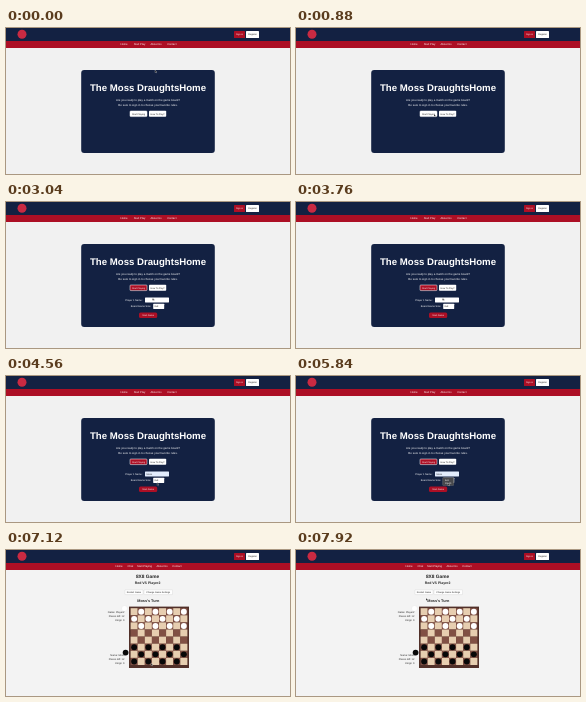
An HTML page that plays this animation: 284 by 146 pixels, repeating every 8 s.

```html
<!DOCTYPE html>
<html lang="en">
<head>
<meta charset="utf-8">
<title>Board game</title>
<style>
  html, body { margin: 0; width: 100%; height: 100%; overflow: hidden; background: #f1f1f1; }
  svg { display: block; width: 100vw; height: 100vh; }
  text { font: 2.7px "Liberation Sans", Arial, sans-serif; fill: #fff; text-anchor: middle; text-rendering: geometricPrecision; }
  .dark { fill: #222; }
  .bold { font-weight: 700; }
  .small { font-size: 2.3px; }
  .end { text-anchor: end; }
  .start { text-anchor: start; }
  .navy { fill: #132142; }
  .red { fill: #ac0f25; }
  .white { fill: #fff; }

  .form, .typed, .menu, .lobby, .match, .fill, .pick, .pick-label, .cursor {
    animation: 8s linear infinite;
  }
  .lobby, .match, .form, .typed, .menu { animation-timing-function: step-end; }
  .lobby { animation-name: lobby; }
  .match { animation-name: match; }
  .form { animation-name: form; }
  .typed { animation-name: typed; }
  .menu { animation-name: menu; }
  .fill { animation-name: fill; }
  .pick { animation-name: pick; }
  .pick-label { animation-name: pick-label; }
  .cursor { animation-name: cursor; animation-timing-function: ease-in-out; }

  @keyframes lobby { 0% { visibility: visible; } 89%, 100% { visibility: hidden; } }
  @keyframes match { 0% { visibility: hidden; } 89%, 100% { visibility: visible; } }
  @keyframes form { 0% { opacity: 0; } 13%, 100% { opacity: 1; } }
  @keyframes typed { 0% { opacity: 0; } 48%, 100% { opacity: 1; } }
  @keyframes menu { 0% { opacity: 0; } 69% { opacity: 1; } 78%, 100% { opacity: 0; } }
  @keyframes fill { 0%, 47.9% { fill: #fff; } 48%, 100% { fill: #e2ecfc; } }
  @keyframes pick { 0%, 13% { fill: #fff; } 17%, 100% { fill: #ac0f25; } }
  @keyframes pick-label { 0%, 13% { fill: #222; } 17%, 100% { fill: #fff; } }
  @keyframes cursor {
    0%, 1% { transform: translate(149px, 42px); }
    11%, 19% { transform: translate(138px, 86px); }
    22%, 24% { transform: translate(140px, 87px); }
    29%, 31% { transform: translate(149px, 97px); }
    33%, 54% { transform: translate(146.5px, 96px); }
    57%, 65% { transform: translate(151px, 106.5px); }
    67%, 69% { transform: translate(152px, 104.5px); }
    73%, 79% { transform: translate(152px, 107px); }
    85%, 90% { transform: translate(145px, 113px); }
    95%, 98% { transform: translate(131px, 50px); }
    99%, 100% { transform: translate(130px, 48px); }
  }
</style>
</head>
<body>
<svg viewBox="0 0 284 146" preserveAspectRatio="none">
  <rect width="284" height="146" fill="#f1f1f1"/>
  <rect class="navy" width="284" height="13"/>
  <rect class="red" y="13" width="284" height="7"/>
  <circle cx="16" cy="6.3" r="4.5" fill="#c92a42"/>
  <rect class="red" x="228" y="3" width="11" height="7" rx=".6"/>
  <text class="small" x="233.5" y="7.3">Sign in</text>
  <rect class="white" x="240" y="3" width="13" height="7" rx=".6"/>
  <text class="small dark" x="246.5" y="7.3">Register</text>

  <g class="lobby">
    <text x="118" y="17.4">Home</text>
    <text x="133.5" y="17.4">Start Play</text>
    <text x="150" y="17.4">About Us</text>
    <text x="165.8" y="17.4">Contact</text>

    <rect class="navy" x="75.2" y="42" width="133.6" height="83" rx="3"/>
    <text class="bold" x="142" y="63.2" style="font-size:9.65px">The Moss DraughtsHome</text>
    <text x="142" y="73" style="font-size:2.85px">Are you ready to play a match on the game board?</text>
    <text x="142" y="77.8" style="font-size:2.85px">Be sure to sign in to choose your favorite rules.</text>

    <rect class="pick" x="124" y="83" width="17" height="5.6" rx=".8" stroke="#fff" stroke-width=".5"/>
    <text class="small pick-label" x="132.5" y="86.6">Start Playing</text>
    <rect class="white" x="143" y="82.8" width="17.2" height="6" rx=".8"/>
    <text class="small dark" x="151.6" y="86.6">How To Play?</text>

    <g class="form">
      <text class="end" x="136.4" y="98.8" style="font-size:2.5px">Player 1 Name:</text>
      <rect class="fill" x="139" y="95.6" width="24" height="4.8" rx=".4"/>
      <text class="small dark start typed" x="140.6" y="98.8">Moss</text>
      <text class="end" x="145.2" y="105.2" style="font-size:2.5px">Board Game Size:</text>
      <rect class="white" x="147.2" y="101.8" width="11" height="5.2" rx=".4"/>
      <text class="small dark start" x="148.6" y="105.2">8x8</text>
      <rect class="red" x="133" y="110.5" width="18.2" height="5.6" rx="1.6"/>
      <text class="small" x="142.1" y="114.1">Start Game</text>
      <g class="menu">
        <rect x="146.6" y="101.4" width="11.2" height="8.2" rx="1" fill="#47484c" stroke="#85878c" stroke-width=".3"/>
        <text class="small start" x="149" y="104.8">8x8</text>
        <text class="small start" x="149" y="108.4">10x10</text>
      </g>
    </g>
  </g>

  <g class="match">
    <rect y="20" width="284" height="126" fill="#f3f3f3"/>
    <text x="113" y="17.4">Home</text>
    <text x="124.3" y="17.4">Chat</text>
    <text x="138.5" y="17.4">Start Playing</text>
    <text x="156" y="17.4">About Us</text>
    <text x="171" y="17.4">Contact</text>

    <text class="dark bold" x="141.5" y="28.3" style="font-size:4.8px">8X8 Game</text>
    <text class="dark bold" x="141.5" y="33.7" style="font-size:3.5px">Red VS Player2</text>
    <g fill="#fff" stroke="#c4c4c4" stroke-width=".3">
      <rect x="119" y="39.8" width="18" height="4.8" rx=".5"/>
      <rect x="138" y="39.8" width="28.5" height="4.8" rx=".5"/>
    </g>
    <text class="small dark" x="128" y="43">Restart Game</text>
    <text class="small dark" x="152.2" y="43">Change Game Settings</text>
    <text class="dark bold" x="142.3" y="52.2" style="font-size:3.8px">Moss's Turn</text>

    <circle cx="118.5" cy="58.4" r="2.9" fill="#fff" stroke="#ddd" stroke-width=".3"/>
    <circle cx="119.6" cy="102.6" r="2.9" fill="#080808"/>
    <g id="notes"></g>
    <rect x="123" y="56.6" width="60" height="61.4" fill="#513029"/>
    <g id="board"></g>
  </g>

  <path class="cursor" d="M0 0V2.6L.6 2.1 1 3 1.5 2.8 1.1 1.9H1.9Z" fill="#111" stroke="#fff" stroke-width=".25"/>
</svg>
<script>
  const add = (parent, tag, attrs, label = "") => {
    const el = document.createElementNS("http://www.w3.org/2000/svg", tag);
    for (const key in attrs) el.setAttribute(key, attrs[key]);
    el.textContent = label;
    parent.append(el);
  };

  const cell = 7.1, left = 124.6, top0 = 58.2;
  const board = document.getElementById("board");
  for (let row = 0; row < 8; row++) {
    for (let col = 0; col < 8; col++) {
      const x = left + col * cell, y = top0 + row * cell;
      const dark = (row + col) % 2;
      add(board, "rect", { x, y, width: cell, height: cell, fill: dark ? "#815044" : "#e7ceb0" });
      if (dark && (row < 3 || row > 4)) {
        add(board, "circle", { cx: x + cell / 2, cy: y + cell / 2, r: 2.95, fill: row < 3 ? "#fff" : "#080808" });
      }
    }
  }

  const notes = document.getElementById("notes");
  for (const [y, name] of [[63, "Player2"], [106, "Moss"]]) {
    [`Name: ${name}`, "Pieces left: 12", "Kings: 0"].forEach((line, i) =>
      add(notes, "text", { x: 118.4, y: y + i * 4.1, class: "dark end", style: "font-size:2.5px" }, line));
  }
</script>
</body>
</html>
```
